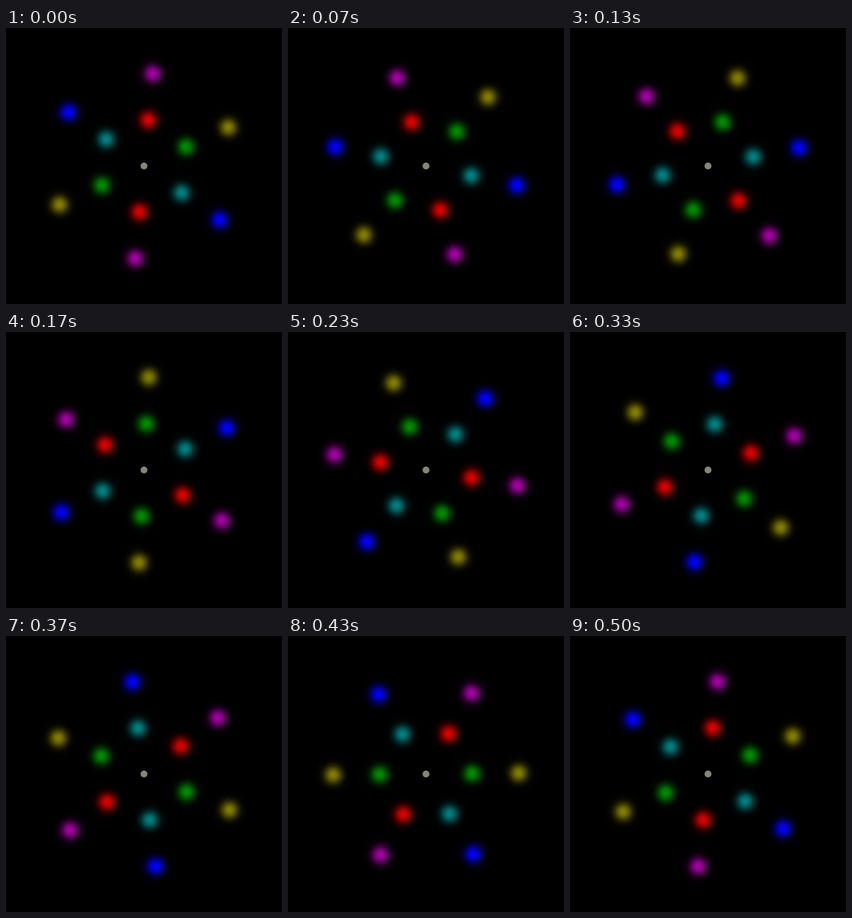
An HTML page with a canvas that plays this animation: 400 px wide and 400 px high, repeating every 530 ms.

```html
<!DOCTYPE html>
<html lang="en">
<head>
<meta charset="utf-8">
<title>Spinning orbs</title>
<style>
  html, body { margin: 0; width: 100%; height: 100%; overflow: hidden; background: #000; }
  canvas { display: block; width: 400px; height: 400px; }
</style>
</head>
<body>
<canvas id="stage" width="400" height="400"></canvas>
<script>
const ctx = document.getElementById('stage').getContext('2d');
const LOOP = 530;
const CENTER = 200;
const START = 24.6;     // degrees, counterclockwise from the right
const TICK = 7.8;       // degrees per timer tick
const TICKS_PER_STEP = 23 / 15;
const REACH = 30;
const GLOW_WIDTH = 12.5;
const GLOW_POWER = 2.2;

const orbs = [
  { radius: 67, angle: 0, color: [0, 140, 0] },
  { radius: 67, angle: 60, color: [220, 0, 0] },
  { radius: 67, angle: 120, color: [0, 128, 128] },
  { radius: 134.5, angle: 0, color: [130, 125, 0] },
  { radius: 134.5, angle: 60, color: [165, 0, 165] },
  { radius: 134.5, angle: 120, color: [0, 0, 250] }
];

function glowStops(color) {
  return Array.from({ length: REACH + 1 }, (_, r) => {
    const level = Math.exp(-((r / GLOW_WIDTH) ** GLOW_POWER));
    return `rgb(${color.map(c => Math.round(c * level)).join(',')})`;
  });
}
orbs.forEach(orb => { orb.stops = glowStops(orb.color); });

function drawGlow(x, y, stops) {
  const gradient = ctx.createRadialGradient(x, y, 0, x, y, REACH);
  stops.forEach((color, r) => gradient.addColorStop(r / REACH, color));
  ctx.fillStyle = gradient;
  ctx.fillRect(x - REACH, y - REACH, 2 * REACH, 2 * REACH);
}

function draw(time) {
  // 30 steps per second, with step times rounded to 10 ms
  const step = Math.floor((Math.floor(time / 10) * 3 + 1) / 10);
  const turn = START + TICK * Math.round(step * TICKS_PER_STEP);

  ctx.globalCompositeOperation = 'source-over';
  ctx.fillStyle = '#000';
  ctx.fillRect(0, 0, 400, 400);

  ctx.globalCompositeOperation = 'lighter';
  for (const { radius, angle, stops } of orbs) {
    for (const side of [0, 180]) {
      const a = (turn + angle + side) * Math.PI / 180;
      drawGlow(CENTER + radius * Math.cos(a), CENTER - radius * Math.sin(a), stops);
    }
  }

  ctx.globalCompositeOperation = 'source-over';
  ctx.fillStyle = '#868674';
  ctx.beginPath();
  ctx.arc(CENTER, CENTER, 5, 0, 2 * Math.PI);
  ctx.fill();
}

function frame() {
  draw(performance.now() % LOOP);
  requestAnimationFrame(frame);
}
frame();
</script>
</body>
</html>
```
